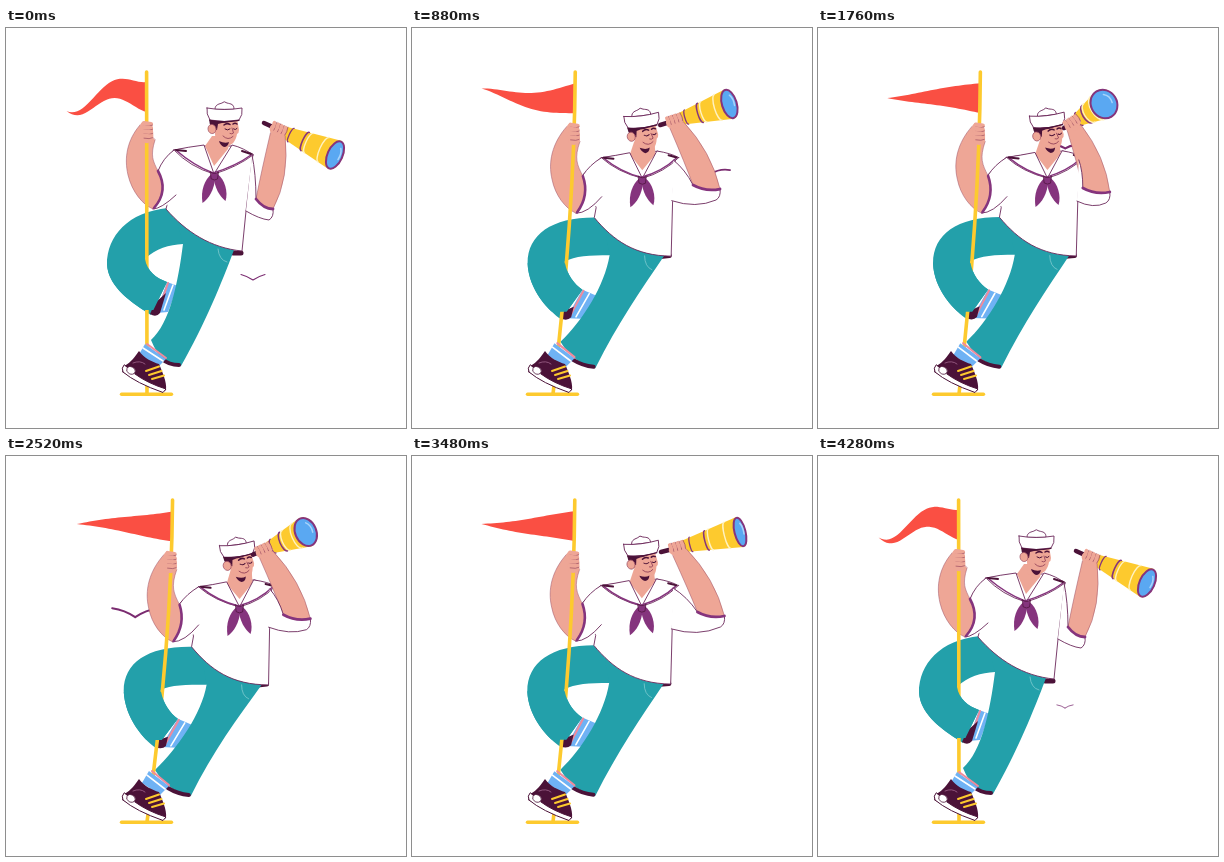
These frames come from a looping animation (400 by 400 pixels, 4.32 s). An HTML page with a canvas:

```html
<!DOCTYPE html>
<html lang="en">
<head>
<meta charset="utf-8">
<title>Sailor</title>
<style>
html, body { margin: 0; width: 100%; height: 100%; overflow: hidden; background: #fff; }
canvas { display: block; width: 400px; height: 400px; }
</style>
</head>
<body>
<canvas id="stage"></canvas>
<script>
const canvas = document.getElementById('stage');
const ctx = canvas.getContext('2d');
const ratio = window.devicePixelRatio || 1;
canvas.width = canvas.height = 400 * ratio;

const LOOP = 4320, TAU = Math.PI * 2;
const SKIN = '#eea696', CREASE = '#9b4c62', DARK = '#4b1238', PURPLE = '#85347d', LINE = '#6d2a5c';
const TEAL = '#23a0aa', YELLOW = '#fdca2e', CREAM = '#fff2c2', RED = '#fa4f43', BLUE = '#5aa8f2';
const SOCK = '#6fb2f4', PINK = '#f08a9b', WHITE = '#fff';

const lerp = (a, b, k) => a + (b - a) * k;
const clamp = k => Math.min(1, Math.max(0, k));
function ease(t, from, to) {
  const k = clamp((t - from) / (to - from));
  return k * k * (3 - 2 * k);
}

// Body lean, raising of the spyglass, its pan towards the viewer, calmness of the flag.
let lean, lift, pan, calm;

function setMotion(t) {
  const back = 1 - ease(t, 3480, 4000);
  const sway = .89 + .1 * Math.cos((t - 1280) / 1320 * TAU);
  lean = sway * ease(t, 0, 820) * back;
  lift = ease(t, 0, 720) * back;
  pan = ease(t, 480, 1700) * (1 - ease(t, 2100, 3200));
  calm = ease(t, 480, 1200) * back;
}

const mix = (a, b) => lerp(a, b, lean);

// Path between the upright pose and the leaning pose.
function pose(upright, leaning) {
  const goal = leaning.match(/-?[\d.]+/g);
  let i = 0;
  return new Path2D(upright.replace(/-?[\d.]+/g, n => mix(+n, +goal[i++]).toFixed(2) + ' '));
}

function draw(path, fill, stroke, width = 1) {
  if (typeof path === 'string') path = new Path2D(path);
  if (fill) { ctx.fillStyle = fill; ctx.fill(path); }
  if (stroke) { ctx.strokeStyle = stroke; ctx.lineWidth = width; ctx.stroke(path); }
}

function ellipse(x, y, rx, ry, fill, stroke, width, turn = 0) {
  const p = new Path2D();
  p.ellipse(x, y, rx, ry, turn, 0, TAU);
  draw(p, fill, stroke, width);
}

function placed(x, y, turn, paint) {
  ctx.save();
  ctx.translate(x, y);
  ctx.rotate(turn);
  paint();
  ctx.restore();
}

// Climbs on the right, then glides to the left behind the sailor.
function gull(t) {
  if (t > 4000) t -= LOOP;
  const up = ease(t, 0, 1430);
  const glide = 1 - (1 - clamp((t - 1430) / 1820)) ** 2;
  const x = lerp(247, 324, up) - 232 * glide;
  const y = lerp(252, 94, up) + 80 * glide;
  const w = lerp(12, 23, up) * clamp((t + 120) / 120) * (1 - ease(t, 2900, 3300));
  if (w < .5) return;
  const beat = Math.cos(t / 320 * TAU), tip = -w * (.2 + .26 * beat);
  const wing = d => `M${x} ${y}Q${x + d * w * .45} ${y + tip * .5 - w * (.2 - .12 * beat)} ${x + d * w} ${y + tip}`;
  draw(wing(-1) + wing(1), null, '#7a2b70', w / 11);
}

function raisedLeg() {
  return pose(
    'M162 180C122 184 101 208 101 236C102 260 128 276 145 287L161 254C150 250 141 243 139 231C150 220 163 217 177 216L200 200Z',
    'M187 191C143 190 118 206 118 235C119 262 138 284 150 292L172 263C164 257 157 247 155 234C165 229 180 229 201 229L222 210Z');
}

function legs() {
  draw(pose('M161 254L172 258L162 284L150 285Z', 'M172 263L186 269L172 292L155 291Z'), SOCK);
  draw(pose('M162 255L153 281', 'M173 264L159 289'), null, PINK, 2);
  draw(pose('M167 257L158 282', 'M179 267L165 290'), null, WHITE, 1.6);
  draw(raisedLeg(), TEAL);
  draw(pose('M144 286Q150 290 154 285L160 265L149 275Z', 'M149 291Q156 294 160 290L162 281L153 284Z'), DARK);
  draw(pose('M227 225L235 225', 'M252 229L261 228'), null, DARK, 5);
  draw(pose(
    'M165 185L228 222C216 254 199 296 175 338C163 338 152 330 145 312C164 295 172 255 177 216L170 190Z',
    'M190 193L256 229C232 262 207 295 185 340C174 338 160 331 149 314C172 292 196 258 201 229L196 200Z'), TEAL);
  draw(pose('M156 331Q163 337 173 337', 'M162 332Q172 338 183 339'), null, DARK, 4);
  draw(pose('M212 221Q213 232 221 234', 'M236 229Q236 240 243 243'), null, '#7fcbd0', .8);
}

function shoe() {
  draw(pose('M139 316L160 331L152 339L132 328Z', 'M143 315L163 330L154 339L136 327Z'), SOCK);
  draw(pose('M141 316L160 330', 'M146 315L163 329'), null, PINK, 2);
  draw(pose('M137 320L157 333', 'M141 319L159 333'), null, WHITE, 1.6);
  draw('M133 323C129 328 126 334 118 338L116 344L156 364L160 362C161 354 156 343 153 336C146 334 138 330 133 323Z', DARK);
  draw('M118 337Q115 340 117 344Q130 355 157 364.5L160 361Q141 355 129 346Z', WHITE, DARK, 1);
  ellipse(125, 342.5, 4.5, 3.6, WHITE, DARK, .8, .5);
  for (let i = 0; i < 3; i++) draw(`M${140 + i * 3} ${343 + i * 4}L${153 + i * 2.5} ${338.5 + i * 4.5}`, null, YELLOW, 2);
  draw('M127 335Q134 332 139 336', null, '#a1668d', .8);
}

function torso() {
  draw(pose(
    'M168 122L198 118L226 118L247 126L240 183L236 223C205 220 180 204 160 181L161 177L152 143Z',
    'M193 131L222 127L249 124L266 131L264 172L263 229C226 229 205 214 186 191L188 180L174 148Z'), WHITE, LINE, .9);
}

function collar() {
  draw(pose('M206 108L199 118L208 138L222 121L220 108Z', 'M225 114L221 128L234 143L247 127L246 113Z'), SKIN);
  draw(pose('M168 122Q182 119 198 117L208 146Q184 139 168 122Z', 'M193 131Q207 129 221 126L234 151Q209 145 193 131Z'), WHITE, LINE, .9);
  draw(pose('M247 127Q238 120 226 117L208 146Q231 139 247 127Z', 'M270 130Q262 126 248 124L234 151Q256 145 270 130Z'), WHITE, LINE, .9);
  draw(pose('M171 123Q187 137 207 145Q230 138 245 127', 'M196 132Q212 145 233 150Q254 144 267 131'), null, PURPLE, 1.5);
  draw(pose('M170 122L180 123M236 123L245 126', 'M195 131L205 132M260 128L268 130'), null, DARK, 2);
  placed(mix(208.5, 234), mix(148, 153), 0, () => {
    draw('M-3 -2C-10 4 -14 14 -12 27C-6 23 0 14 1 0Z', PURPLE);
    draw('M-1 0C0 12 5 20 11 25C14 16 10 3 3 -2Z', PURPLE);
    draw('M-4 -4Q0 -1 4 -4L3 3Q0 5 -3 3Z', PURPLE, DARK, .7);
  });
}

function poleArm() {
  draw(pose(
    'M134 97C121 112 118 130 122 147C126 164 137 177 147 181Q163 163 152 143C147 133 144 128 149 112Z',
    'M158 99C143 116 139 135 143 152C146 168 156 181 167 186Q180 168 174 149C168 137 165 131 171 114Z'), SKIN, CREASE, .5);
  draw(pose('M168 122Q157 130 152 143Q163 163 147 181Q155 181 161 177L180 160Z',
    'M193 131Q181 138 174 148Q179 166 167 186Q179 186 188 178L202 160Z'), WHITE);
  draw(pose('M168 122Q157 130 152 143M147 181Q155 181 170 167',
    'M193 131Q181 138 174 148M167 186Q179 186 193 169'), null, LINE, .9);
  draw(pose('M152 143Q163 163 148 180', 'M174 149Q180 168 168 185'), null, PURPLE, 2.6);
}

// A wave runs from the pole to the tip and dies down as the flag fills.
function flag(t, x) {
  const phase = t / LOOP * 2 * TAU;
  const waves = 5.4 - 1.4 * ease(t, 0, 480) * (1 - ease(t, 3480, 4000));
  const size = 18 - 16 * calm, length = mix(80, 96), middle = 69 + lean * 1.5;
  const edge = side => Array.from({ length: 31 }, (_, i) => {
    const s = i / 30;
    const y = middle - size * s ** .7 * Math.sin(waves * s - phase) - 2 * s * calm;
    return `${x - length * s} ${y + side * 15 * (1 - s)}`;
  });
  draw('M' + [...edge(-1), ...edge(1).reverse()].join('L') + 'Z', RED);
}

function pole(t) {
  const top = mix(140.6, 167);
  flag(t, top);
  draw(`M${top} 44Q${mix(140.6, 166)} 190 141 366`, null, YELLOW, 3.6);
  draw('M115.5 366.3H165.5', null, YELLOW, 3.4);
}

function poleHand() {
  placed(mix(141, 165), mix(103, 105), 0, () => {
    draw('M-7 -5Q-6 -11 0 -9L5 -7Q7 3 6 9Q1 15 -5 10Z', SKIN);
    for (let y = -7; y < 8; y += 4.2) {
      draw(`M-3 ${y - 1}L4 ${y}`, null, SKIN, 4.2);
      draw(`M-3 ${y + 1.6}Q3 ${y + 2.8} 5.5 ${y + 1.2}`, null, CREASE, .7);
    }
  });
}

// The shin wraps in front of the pole.
function shin() {
  ctx.save();
  ctx.beginPath();
  ctx.rect(90, mix(231, 236), 100, mix(51, 48));
  ctx.clip();
  draw(raisedLeg(), TEAL);
  ctx.restore();
}

function head() {
  placed(mix(218, 231), mix(84, 91.5), mix(0, -.14), () => {
    draw('M-9 18L-8 34L4 37L7 26Z', SKIN);
    draw('M-11 7L13 6L15 18Q15 21 13 22C12 29 8 34 2 34C-4 33 -8 27 -9 22Z', SKIN);
    draw('M-15 7L10 7Q6 11 -2 11L-6 12L-7 18L-12 16Q-15 12 -15 7Z', DARK);
    ellipse(-12, 17, 4, 4.6, SKIN, CREASE, .7, -.2);
    draw('M-5 29Q1 32 5 30Q4 35 0 35Q-4 33 -5 29Z', DARK);
    draw('M0 13Q3 10.5 6 12.5M9 12Q11 10.5 13 12', null, DARK, 1.5);
    draw('M1 17Q3.5 19 6 17M9.5 17Q11.5 18.5 13 16.5', null, DARK, 1);
    draw('M8 16L9.5 21Q8 22.5 6 21.5M-1 24Q4 29 9 24.5', null, '#8d3b55', .8);
    draw('M-9 -3C-9 -8 -4 -8 -2 -9Q0 -11.5 3 -9C7 -8 10 -8 10 -3Z', WHITE, LINE, .9);
    draw('M-17 -4Q0 -1 18 -4Q19 3 15 8Q0 11 -14 8Q-18 2 -17 -4Z', WHITE, LINE, .9);
    draw('M-14 8.3Q0 11 15 8.3', null, DARK, 1.2);
  });
}

function spyglass(len, depth) {
  const ring = (k, color, width) => {
    const p = new Path2D();
    p.ellipse(len * k, 0, depth * k * .6, 2.5 + 13 * k, 0, Math.PI / 2, Math.PI * 1.5);
    draw(p, null, color, width);
  };
  draw(`M0 0H${len * .3}`, null, DARK, 4.5);
  draw(`M${len * .22} -5L${len} -15.5V15.5L${len * .22} 5Z`, YELLOW);
  ring(.38, PURPLE, 1.3);
  ring(.58, PURPLE, 1.5);
  ring(.63, CREAM, 1.4);
  ring(.84, CREAM, 1.4);
  ellipse(len, 0, depth, 15.3, YELLOW);
  ellipse(len, 0, depth - .5, 14.6, BLUE, PURPLE, 2);
  const shine = new Path2D();
  shine.ellipse(len, 0, depth * .6, 10, 0, -1, .3);
  draw(shine, null, '#a9d4fb', 1.5);
}

function scopeHand() {
  ellipse(0, 1, 8.5, 6.8, SKIN);
  for (let x = -6; x < 7; x += 4) {
    draw(`M${x} -4.5L${x + 1} 2`, null, SKIN, 4);
    draw(`M${x + 2} -6Q${x + 3.4} -1 ${x + 2.4} 2.5`, null, CREASE, .7);
  }
}

function scopeArm() {
  const up = (a, b) => lerp(a, b, lift);
  const eyeX = up(258, 249 - 3 * pan), eyeY = up(95, 96 + 4 * pan);
  const dx = up(71, 79 - 39 * pan), dy = up(32, -20 - 4 * pan);
  const aim = Math.atan2(dy, dx), depth = up(8, 6 + 7.5 * pan);
  placed(eyeX, eyeY, aim, () => spyglass(Math.hypot(dx, dy), depth));

  // The elbow follows the lean and pulls in as the spyglass pans.
  const hx = eyeX + dx * .2, hy = eyeY + dy * .2;
  const cx = up(258.5, 267 + 38 * lean - 20 * pan), cy = up(176, 158 + 4 * pan);
  const halfX = up(8.5, 13.5), halfY = up(5, 2);
  const ix = cx - halfX, iy = cy - halfY, ox = cx + halfX, oy = cy + halfY;

  const reach = Math.hypot(cx - hx, cy - hy), ux = (cx - hx) / reach, uy = (cy - hy) / reach;
  const off = (along, out) => `${hx + ux * along + uy * out} ${hy + uy * along - ux * out}`;
  draw(`M${off(5, -7)}Q${off(reach * .6, -9)} ${ix} ${iy}L${ox - 4} ${oy + 7}L${ox} ${oy}`
    + `Q${off(reach * .6, 20)} ${off(5, 8)}Z`, SKIN, CREASE, .5);
  placed(hx, hy, aim, scopeHand);

  const sx = mix(246, 264), sy = mix(127, 133), pitX = mix(240, 263), pitY = mix(183, 171);
  const cuff = `Q${cx - 1} ${cy + 5} ${ox} ${oy}`;
  draw(`M${sx} ${sy}Q${(sx + ix) / 2 + 2} ${(sy + iy) / 2 - 3} ${ix} ${iy}${cuff}`
    + `Q${ox + 1} ${oy + 8} ${ox - 4} ${oy + 11}`
    + `Q${(ox + pitX) / 2} ${Math.max(oy, pitY) + 8} ${pitX} ${pitY}`, WHITE, LINE, .9);
  draw(`M${ix} ${iy}${cuff}`, null, PURPLE, 2.8);
}

function render(t) {
  setMotion(t);
  ctx.setTransform(ratio, 0, 0, ratio, 0, 0);
  ctx.fillStyle = WHITE;
  ctx.fillRect(0, 0, 400, 400);
  ctx.lineCap = ctx.lineJoin = 'round';
  gull(t);
  legs();
  torso();
  collar();
  poleArm();
  pole(t);
  poleHand();
  shin();
  shoe();
  head();
  scopeArm();
}

const start = performance.now();
function tick() {
  render((performance.now() - start) % LOOP);
  requestAnimationFrame(tick);
}
tick();
</script>
</body>
</html>
```
